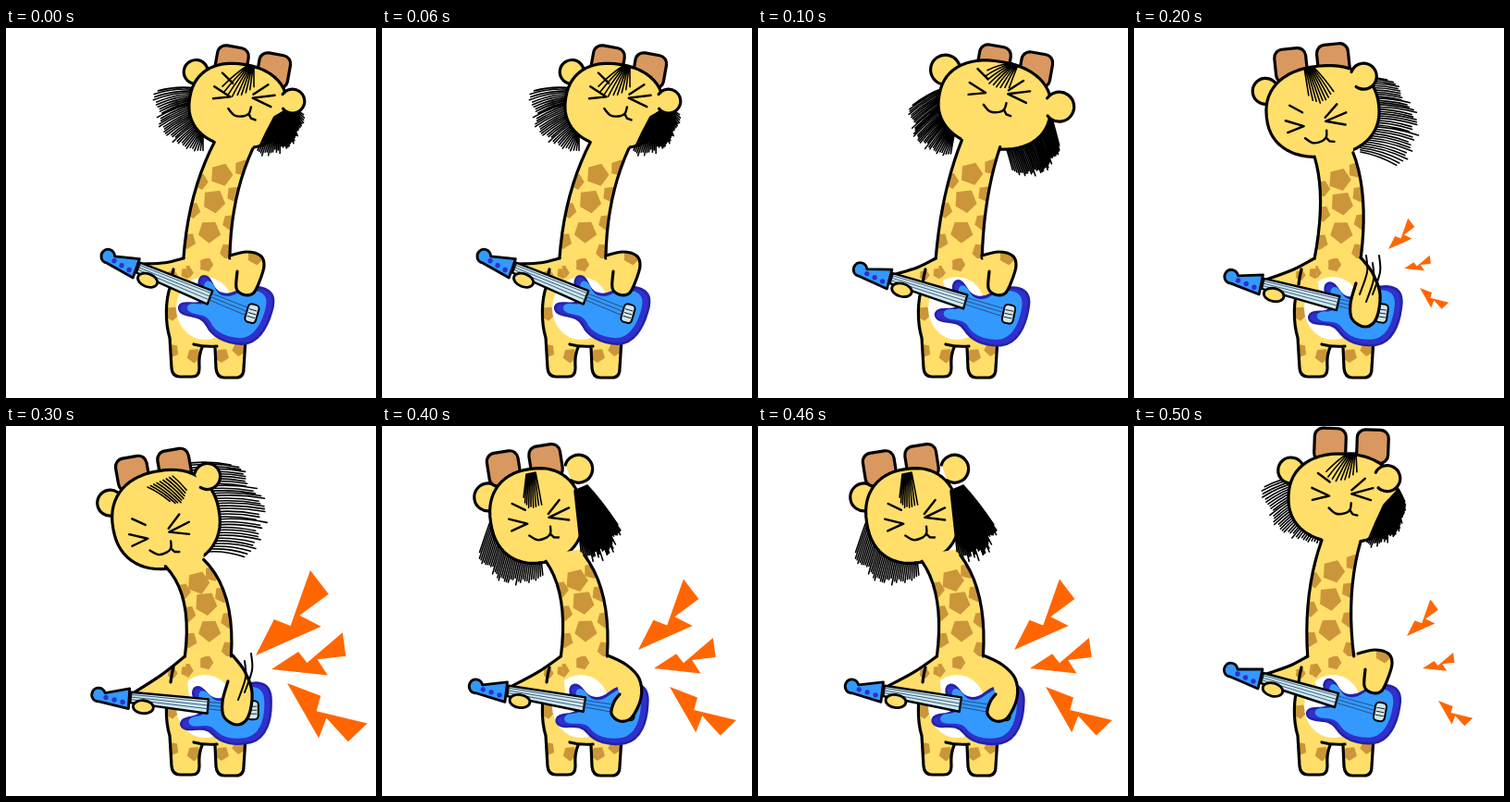
Animation, 400 px wide and 400 px high, one loop 0.6 s. Source, as an HTML page with a canvas:

```html
<!DOCTYPE html>
<html lang="en">
<head>
<meta charset="utf-8">
<title>Giraffe guitarist</title>
<style>
  html, body { margin: 0; width: 100%; height: 100%; overflow: hidden; background: #fff; }
  canvas { display: block; width: 100vw; height: 100vh; }
</style>
</head>
<body>
<canvas id="stage"></canvas>
<script>
const STEP = 100, LINE = 3.2;
const SKIN = '#ffde6a', SPOT = '#cb9639', HORN = '#d9985f', INK = '#000';
const BLUE = '#3399ff', NAVY = '#3030cc', FRET = '#cfe8ee', ORANGE = '#ff6600';

// head: x, y, half width, half height, tilt. horn, ear and face: offsets inside the head.
// neck: joint x, y, bow. guitar: shift x, y, turn. locks: root line, tip line.
// bolts: first tip x, y, gap, scale.
const poses = [
  { head: [251, 84, 53, 45, 10], horn: [8, -46], ear: [57, -15, 13], face: [4, -10],
    neck: [246, 127, 3], guitar: [0, -2, 6], arm: 'raised',
    back: [[205, 65, 213, 118, 163, 68, 213, 134]],
    front: [[308, 85, 290, 96, 322, 94, 270, 136]],
    bangs: [262, 40, 268, 41, 233, 64, 268, 65] },
  { head: [256, 83, 61, 47, 10], horn: [14, -47], ear: [69, -10, 16], face: [2, -13],
    neck: [241, 125, 4], guitar: [5, 0, 1], arm: 'raised',
    back: [[200, 65, 212, 116, 166, 84, 208, 138], [318, 98, 268, 128, 326, 128, 276, 156]],
    bangs: [274, 38, 281, 40, 247, 46, 271, 66] },
  { head: [204, 90, 61, 49, -6], horn: [-6, -55], ear: [48, -33, 14], face: [-8, 12],
    neck: [216, 137, 14], guitar: [2, 0, -2], arm: 'strum', swish: 3,
    back: [[235, 55, 245, 134, 275, 56, 288, 150]],
    bangs: [184, 43, 194, 42, 189, 74, 217, 70],
    bolts: [275, 239, 21, .36] },
  { head: [173, 101, 58, 53, -10], horn: [-4, -57], ear: [52, -38, 14], face: [-9, 15],
    neck: [193, 148, 8], guitar: [1, 1, -10], arm: 'strum', swish: 2,
    back: [[185, 42, 218, 136, 245, 42, 262, 142]],
    bangs: [153, 66, 180, 54, 178, 82, 196, 70],
    bolts: [270, 248, 15, 1] },
  { head: [167, 97, 50, 51, -9], horn: [-4, -58], ear: [53, -43, 15], face: [3, 5],
    neck: [198, 143, 8], guitar: [1, 1, -6.5], arm: 'rest',
    back: [[120, 95, 172, 144, 105, 138, 174, 163]],
    front: [[222, 64, 208, 70, 256, 108, 216, 143]],
    bangs: [156, 52, 166, 50, 153, 78, 173, 87],
    bolts: [277, 242, 20, .83] },
  { head: [226, 78, 59, 48, 2], horn: [7, -59], ear: [47, -23, 14], face: [-1, -4],
    neck: [224, 124, -11], guitar: [0, 0, 0], arm: 'raised',
    back: [[175, 55, 205, 118, 140, 66, 208, 126]],
    front: [[286, 68, 270, 85, 293, 82, 250, 130]],
    bangs: [232, 29, 240, 29, 207, 50, 241, 51],
    bolts: [295, 227, 35, .43] }
];

const arms = {
  raised: [242,246, 260,242, 275,246, 279,257, 274,274, 267,287, 256,288, 249,281, 250,263],
  strum: [245,248, 258,265, 266,288, 262,314, 250,323, 236,315, 234,298, 240,276],
  rest: [244,248, 264,258, 278,273, 280,294, 270,315, 257,319, 248,311, 251,298, 257,290]
};
const bodySpots = [217,256, 195,264, 179,309, 203,354, 233,354, 252,347, 179,349];
const features = [
  [-27,-22, -14,-13], [-33,-6, -14,2, -32,7],
  [24,-18, 10,-5], [33,-8, 10,-1, 31,5],
  [-14,15, -6,21, 4,20, 9,16, 10,9], [9,17, 12,21, 17,22]
];
// Unit bolt lying along x with its point at the origin
const bolt = [0,0, .4,-.1, .46,.07, 1.02,-.15, .96,.15, .6,.07, .66,.31];

const canvas = document.getElementById('stage');
const ctx = canvas.getContext('2d');
const rad = deg => deg * Math.PI / 180;
const mix = (a, b, t) => a + (b - a) * t;
const noise = i => { const s = Math.sin(i * 127.1) * 43758.5453; return s - Math.floor(s) - .5; };

function paint(path, fill, width = 0, ink = INK) {
  if (fill) { ctx.fillStyle = fill; ctx.fill(path); }
  if (width) { ctx.strokeStyle = ink; ctx.lineWidth = width; ctx.stroke(path); }
}

function placed(x, y, turn, draw) {
  ctx.save();
  ctx.translate(x, y);
  ctx.rotate(turn);
  draw();
  ctx.restore();
}

function clipped(path, draw) {
  ctx.save();
  ctx.clip(path);
  draw();
  ctx.restore();
}

function poly(pts, close = true) {
  const p = new Path2D();
  for (let i = 0; i < pts.length; i += 2) p.lineTo(pts[i], pts[i + 1]);
  if (close) p.closePath();
  return p;
}

// Smooth open curve through all points
function spline(pts) {
  const n = pts.length / 2, p = new Path2D();
  const at = i => { const k = 2 * Math.max(0, Math.min(n - 1, i)); return [pts[k], pts[k + 1]]; };
  p.moveTo(pts[0], pts[1]);
  for (let i = 0; i < n - 1; i++) {
    const [a, b, c, d] = [at(i - 1), at(i), at(i + 1), at(i + 2)];
    p.bezierCurveTo(b[0] + (c[0] - a[0]) / 6, b[1] + (c[1] - a[1]) / 6,
                    c[0] - (d[0] - b[0]) / 6, c[1] - (d[1] - b[1]) / 6, c[0], c[1]);
  }
  return p;
}

function ellipse(x, y, rx, ry, fill, width, from = 0, to = Math.PI * 2) {
  const p = new Path2D();
  p.ellipse(x, y, rx, ry, 0, from, to);
  paint(p, fill, width);
}

function spot(x, y, r, seed) {
  const pts = [];
  for (let k = 0; k < 5; k++) {
    const a = seed * 1.3 + k * Math.PI * .4, q = r * (1 + noise(seed * 5 + k) * .2);
    pts.push(x + q * Math.cos(a), y + q * Math.sin(a));
  }
  paint(poly(pts), SPOT);
}

// Strands from a root line to a tip line that bulges away from the roots
function lock([ax, ay, bx, by, cx, cy, dx, dy], n = 36) {
  const side = Math.sign((dy - cy) * (cx + dx - ax - bx) - (dx - cx) * (cy + dy - ay - by));
  const p = new Path2D();
  for (let i = 0; i < n; i++) {
    const t = i / (n - 1), bulge = side * .88 * t * (1 - t), reach = 1 + noise(i + 1) * .2;
    const x = mix(ax, bx, t), y = mix(ay, by, t);
    const ex = mix(x, mix(cx, dx, t) + bulge * (dy - cy), reach);
    const ey = mix(y, mix(cy, dy, t) - bulge * (dx - cx), reach);
    p.moveTo(x, y);
    p.quadraticCurveTo((x + ex) / 2, (y + ey) / 2 - Math.abs(ex - x) * .1, ex, ey);
  }
  paint(p, null, 1.6);
}

const torso = new Path2D('M190 248C184 256 180 266 178 278C172 295 172 318 177 340L179 368Q180 377 188 377H201Q209 377 209 368L211 344H226L227 368Q228 378 236 378H249Q257 378 257 368L259 330L264 285L244 245Z');
const torsoLines = new Path2D('M181 261C180 268 179 273 178 278C172 295 172 318 177 335L179 368Q180 377 188 377H201Q209 377 209 368Q208 354 212 345M203 342Q214 345 228 344M226 345L227 368Q228 378 236 378H249Q257 378 257 368L259 336');

function drawBody() {
  paint(torso, SKIN);
  clipped(torso, () => {
    for (let i = 0; i < bodySpots.length; i += 2) spot(bodySpots[i], bodySpots[i + 1], 8, i);
  });
  ellipse(215, 303, 31, 34, '#fff');
  paint(torsoLines, null, LINE);
}

// Point on the neck: t runs down, u runs across from -1 to 1
function neckPoint({ neck: [x, y, bow], head }, t, u) {
  const tilt = rad(head[4]) * (1 - t), half = mix(21, 25, t), s = 1 - t;
  return [
    s * s * x + 2 * s * t * (217 + bow) + t * t * (216 + bow * .3) + u * half * Math.cos(tilt),
    s * s * y + 2 * s * t * 180 + t * t * 249 + u * half * Math.sin(tilt)
  ];
}

function drawNeck(pose) {
  const side = u => {
    const pts = [];
    for (let i = 0; i <= 10; i++) pts.push(neckPoint(pose, i / 10, u));
    return pts;
  };
  const left = side(-1), right = side(1);
  const [lx, ly] = left[0], [rx, ry] = right[0];
  const shape = poly([lx, ly - 7, ...left.flat(), ...right.reverse().flat(), rx, ry - 7]);
  paint(shape, SKIN);
  clipped(shape, () => {
    for (let i = 0; i < 10; i++) {
      const column = i % 3 - 1;
      const [x, y] = neckPoint(pose, .2 + i * .083, -column * .9);
      spot(x, y, column ? 9 : 13, i);
    }
  });
  paint(poly(left.flat(), false), null, LINE);
  paint(poly(right.flat(), false), null, LINE);
}

function skull(rx, ry) {
  const pts = [], soft = v => Math.sign(v) * Math.abs(v) ** .88;
  for (let a = 0; a < 360; a += 6) pts.push(rx * soft(Math.cos(rad(a))), ry * soft(Math.sin(rad(a))));
  return poly(pts);
}

function inHead({ head: [x, y, , , tilt] }, draw) {
  placed(x, y, rad(tilt), draw);
}

function drawHeadBack({ head: [, , rx], horn: [hx, hy], ear: [, , r] }) {
  ellipse(-.97 * rx, -28, r, r, SKIN, LINE);
  for (const side of [-1, 1]) {
    const p = new Path2D();
    p.roundRect(hx + side * 23 - 17, hy - 16, 34, 36, 9);
    paint(p, HORN, LINE);
  }
}

function drawFace({ ear: [x, y, r], face }) {
  ellipse(x, y, r, r, SKIN, LINE, -2.7, 2.3);
  placed(...face, 0, () => features.forEach(f => paint(spline(f.length > 6 ? f : []), null, 2.4)));
  placed(...face, 0, () => features.forEach(f => f.length <= 6 && paint(poly(f, false), null, 2.4)));
}

const shell = new Path2D('M208 275C213 272 217 277 221 284C227 293 238 293 246 288C256 282 266 278 277 281C288 284 289 294 287 304C284 322 276 341 258 343C240 344 226 338 219 327C214 319 207 319 198 318C187 317 185 311 189 307C194 303 203 307 209 303C215 298 206 290 206 284C205 280 206 277 208 275Z');
const headstock = new Path2D('M112 263H139L134 284L104 271C97 270 96 263 99 259C103 254 111 256 112 263Z');

function drawGuitar() {
  paint(shell, NAVY, 2.6, '#2222a8');
  ctx.save();
  ctx.translate(241, 304);
  ctx.scale(.84, .84);
  ctx.translate(-241, -304);
  paint(shell, BLUE);
  ctx.restore();
  paint(poly([140,267, 221,289, 217,304, 137,278]), FRET, 2.4);
  const strings = new Path2D();
  for (let k = 0; k < 3; k++) {
    strings.moveTo(139, 269.5 + k * 2.7);
    strings.lineTo(264, 304 + k * 4.5);
  }
  paint(strings, null, .8, '#23406a');
  placed(266, 309, .18, () => {
    const bridge = new Path2D();
    bridge.roundRect(-6, -10, 12, 20, 4);
    paint(bridge, FRET, 2);
    paint(new Path2D('M-4 -4H4M-4 0H4M-4 4H4'), null, .8);
  });
  paint(headstock, BLUE, 2.8);
  for (let k = 0; k < 3; k++) ellipse(112 + k * 8.5, 268 + k * 4, 2.7, 2.7, NAVY);
  placed(150, 285, .25, () => ellipse(0, 0, 11, 7, SKIN, 2.8));
}

function drawGuitarSide(pose) {
  const [dx, dy, deg] = pose.guitar, a = rad(deg), c = Math.cos(a), s = Math.sin(a);
  const at = (x, y) => [250 + dx + (x - 250) * c - (y - 309) * s, 309 + dy + (x - 250) * s + (y - 309) * c];
  const [sx, sy] = neckPoint(pose, 1, -1), [hx, hy] = at(143, 268);
  const edge = [sx, sy, mix(sx, hx, .45), mix(sy, hy, .45) + 2, hx, hy];
  const sleeve = spline(edge);
  sleeve.lineTo(...at(200, 292));
  paint(sleeve, SKIN);
  clipped(sleeve, () => {
    spot(195, 265, 6, 3);
    spot(180, 267, 6, 1);
  });
  paint(spline(edge), null, LINE);
  paint(new Path2D('M181 261Q179 268 178 277'), null, LINE);
  placed(250 + dx, 309 + dy, a, () => {
    ctx.translate(-250, -309);
    drawGuitar();
  });
}

function drawArm({ arm, swish = 0 }) {
  const shape = spline(arms[arm]);
  paint(shape, SKIN);
  if (arm === 'raised') clipped(shape, () => spot(270, 247, 10, 4));
  paint(shape, null, LINE);
  for (let i = 0; i < swish; i++) {
    const x = 270 - i * 7, y = 246 + i % 2 * 8;
    paint(spline([x - 5, y, x - 4, y + 18, x - 12, y + 42]), null, 2);
  }
}

function drawBolts([x, y, gap, scale]) {
  [[-49, 106], [-19, 84], [35, 94]].forEach(([angle, size], i) =>
    placed(x + 17 * i, y + gap * i, rad(angle), () =>
      paint(poly(bolt.map(v => v * size * scale)), ORANGE)));
}

function draw(pose) {
  const k = canvas.width / 400;
  ctx.setTransform(k, 0, 0, k, 0, 0);
  ctx.fillStyle = '#fff';
  ctx.fillRect(0, 0, 400, 400);
  ctx.lineCap = ctx.lineJoin = 'round';
  pose.back.forEach(l => lock(l));
  inHead(pose, () => drawHeadBack(pose));
  drawBody();
  inHead(pose, () => paint(skull(pose.head[2], pose.head[3]), SKIN, LINE));
  drawNeck(pose);
  (pose.front || []).forEach(l => lock(l));
  lock(pose.bangs, 9);
  inHead(pose, () => drawFace(pose));
  drawGuitarSide(pose);
  drawArm(pose);
  if (pose.bolts) drawBolts(pose.bolts);
}

canvas.width = canvas.height = 400 * (window.devicePixelRatio || 1);
let shown = -1;
const start = performance.now();
function tick() {
  const i = Math.floor((performance.now() - start) / STEP) % poses.length;
  if (i !== shown) draw(poses[shown = i]);
  requestAnimationFrame(tick);
}
tick();
</script>
</body>
</html>
```
